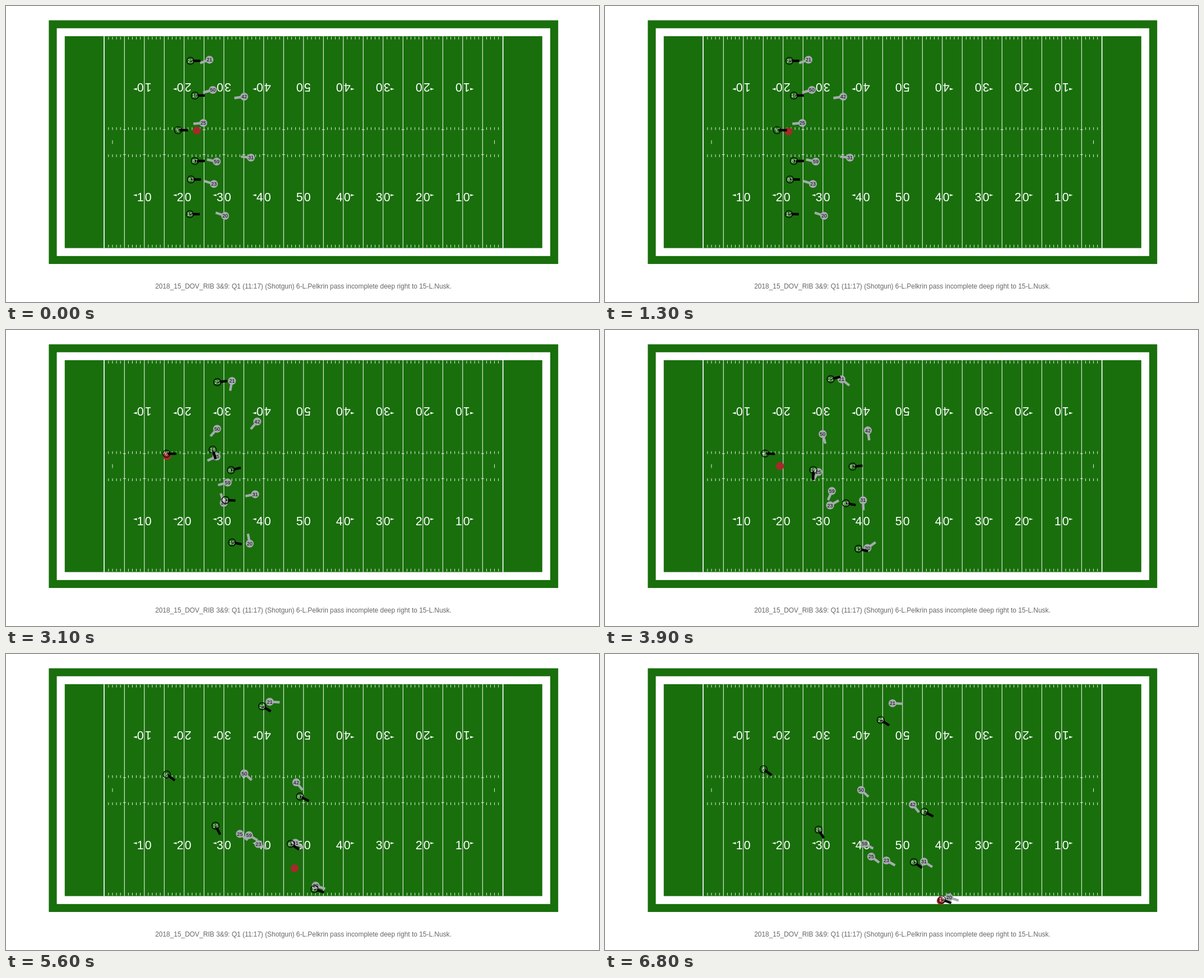
Recreate the animation shown at these times as an HTML page with a canvas. Size 1058 by 529 pixels, loop 6.9 s.

```html
<!DOCTYPE html>
<html lang="en">
<head>
<meta charset="utf-8">
<title>Play tracking</title>
<style>
html, body { margin: 0; width: 100%; height: 100%; overflow: hidden; background: #fff; }
canvas { display: block; }
</style>
</head>
<body>
<canvas id="stage" width="1058" height="529"></canvas>
<script>
const ctx = document.getElementById('stage').getContext('2d');
const LOOP = 6900, STEP = 100, TAU = Math.PI * 2;
const SNAP = 1300, THROW = 3700, CATCH = 6400, END = 6800;
const GREEN = '#196f0c', GREY = '#a5acaf', FONT = '"Liberation Sans", Arial, sans-serif';
const CAPTION = '2018_15_DOV_RIB 3&9: Q1 (11:17) (Shotgun) 6-L.Pelkrin pass incomplete deep right to 15-L.Nusk.';

const clamp = u => Math.max(0, Math.min(1, u));
const mix = (a, b, u) => a + (b - a) * u;
const smooth = (from, to, t) => {
  const u = clamp((t - from) / (to - from));
  return u * u * (3 - 2 * u);
};
const angleTo = (a, b) => Math.atan2(b.y - a.y, b.x - a.x);
const turn = (from, to, u) => from + Math.atan2(Math.sin(to - from), Math.cos(to - from)) * u;

// Smooth route from a standing start at the snap, through evenly timed points
function route(points) {
  const last = points.length - 1;
  return t => {
    const s = clamp((t - SNAP) / (END - SNAP)) * last;
    const i = Math.min(last - 1, Math.floor(s)), u = s - i, v = 1 - u;
    const axis = k => {
      const a = points[i][k], b = points[i + 1][k];
      const leave = i ? (b - points[i - 1][k]) / 2 : 0;
      const arrive = i + 1 < last ? (points[i + 2][k] - a) / 2 : b - a;
      return mix(a, b, u * u * (3 - 2 * u)) + u * v * (leave * v - arrive * u);
    };
    return { x: axis(0), y: axis(1) };
  };
}

const player = (number, ...points) => ({ number, at: route(points) });

const defense = [
  player(21, [363, 96], [404, 91], [450, 85], [513, 88]),
  player(50, [369, 150], [377, 177], [410, 200], [457, 243]),
  player(42, [425, 162], [449, 164], [501, 210], [549, 269]),
  player(25, [352, 209], [376, 227], [394, 299], [475, 362]),
  player(59, [376, 278], [396, 273], [420, 314], [463, 339]),
  player(31, [437, 271], [445, 294], [492, 322], [569, 371]),
  player(23, [371, 318], [389, 309], [427, 327], [502, 369]),
  player(20, [391, 375], [436, 382], [521, 404], [614, 435])
];
const passer = player(6, [307, 222], [286, 221], [288, 219], [283, 206]);
const offense = [
  player(25, [329, 98], [378, 93], [438, 85], [492, 118]),
  player(16, [337, 160], [369, 215], [371, 296], [381, 314]),
  passer,
  player(87, [337, 277], [403, 250], [498, 245], [570, 282]),
  player(83, [330, 310], [393, 304], [483, 325], [551, 372]),
  player(15, [328, 372], [405, 380], [520, 410], [601, 439])
];

function ballAt(t) {
  const held = passer.at(Math.min(t, THROW));
  const snap = clamp((t - 1100) / 500), u = clamp((t - THROW) / (CATCH - THROW));
  const flight = u + 0.13 * u * (1 - u);
  return {
    x: mix(mix(340.5, held.x + 1, snap), 599, flight),
    y: mix(mix(222.5, held.y + 4.5, snap), 441, flight)
  };
}

const heading = (p, t) => angleTo(p.at(t - STEP), p.at(t));

// Defenders watch the passer, then turn and run with the play
function defenderFacing(p, t) {
  const watch = turn(Math.PI, angleTo(p.at(t), passer.at(t)), mix(0.3, 1, smooth(SNAP, 3100, t)));
  return turn(watch, heading(p, t), smooth(2300, 4900, t));
}

function attackerFacing(p, t) {
  return p === passer
    ? turn(0, angleTo(p.at(t), ballAt(t)), smooth(THROW, 5200, t))
    : turn(0, heading(p, t), smooth(SNAP, 2600, t));
}

function box(color, x, y, w, h) {
  ctx.fillStyle = color;
  ctx.fillRect(x, y, w, h);
}

function label(text, x, y, size, color) {
  ctx.font = `${size}px ${FONT}`;
  ctx.fillStyle = color;
  ctx.fillText(text, x, y);
}

function disc({ x, y }, color) {
  ctx.fillStyle = color;
  ctx.beginPath();
  ctx.arc(x, y, 7.1, 0, TAU);
  ctx.fill();
}

const YARD = 7.1, MID_X = 530.8, MID_Y = 243.3, HALF_WIDTH = 80 / 3 * YARD;
const yardX = yard => MID_X + (yard - 50) * YARD;

function drawTurf(color, margin) {
  const w = (60 + margin) * YARD, h = HALF_WIDTH + margin * YARD;
  box(color, MID_X - w, MID_Y - h, 2 * w, 2 * h);
}

function drawYardNumber(yard) {
  const tens = Math.min(yard, 100 - yard) / 10;
  for (const flip of [1, -1]) {
    ctx.save();
    ctx.translate(yardX(yard), MID_Y);
    ctx.scale(flip, flip);
    label(tens, -7.1, 105.2, 21.4, '#fff');
    label('0', 6.9, 105.2, 21.4, '#fff');
    if (yard !== 50) {
      const side = Math.sign(yard - 50) * flip;
      ctx.beginPath();
      ctx.moveTo(side * 20, 94.8);
      ctx.lineTo(side * 13.3, 92.9);
      ctx.lineTo(side * 13.3, 96.7);
      ctx.fill();
    }
    ctx.restore();
  }
}

function drawField() {
  box('#fff', 0, 0, 1058, 529);
  drawTurf(GREEN, 4);
  drawTurf('#fff', 2);
  drawTurf(GREEN, 0);
  const top = MID_Y - HALF_WIDTH;
  for (const x of [yardX(0) - 1.6, yardX(100)]) box('#fff', x, top, 1.7, 2 * HALF_WIDTH);
  for (let yard = 1; yard < 100; yard++) {
    const x = yardX(yard);
    if (yard % 5 === 0) {
      box('#fff', x - 0.5, top, 1, 2 * HALF_WIDTH);
      for (const y of [220.5, 265.2]) box('#fff', x - 2.5, y, 5, 0.9);
    } else {
      for (const y of [55, 216.7, 265.2, 426.7]) box('#fff', x - 0.45, y, 0.9, 4.8);
    }
  }
  for (const yard of [2, 98]) box('#fff', yardX(yard) - 0.5, 240, 0.9, 6.6);
  for (let yard = 10; yard < 100; yard += 10) drawYardNumber(yard);
  label(CAPTION, 530.5, 505, 11.93, '#666');
}

function drawPlayer(p, t, isOffense) {
  const spot = p.at(t), { x, y } = spot;
  const a = (isOffense ? attackerFacing : defenderFacing)(p, t);
  ctx.strokeStyle = isOffense ? '#000' : GREY;
  if (!isOffense) disc(spot, GREY);
  ctx.lineWidth = 4.4;
  ctx.beginPath();
  ctx.moveTo(x, y);
  ctx.lineTo(x + 17.8 * Math.cos(a), y + 17.8 * Math.sin(a));
  ctx.stroke();
  if (isOffense) {
    ctx.lineWidth = 1.2;
    ctx.beginPath();
    ctx.arc(x, y, 6.5, 0, TAU);
    ctx.stroke();
  }
  label(p.number, x, y + 3.2, 9, isOffense ? '#fff' : '#000');
}

function draw(now) {
  const t = Math.floor((now % LOOP) / STEP) * STEP;
  ctx.textAlign = 'center';
  drawField();
  for (const p of defense) drawPlayer(p, t, false);
  disc(ballAt(t), '#a52a2a');
  for (const p of offense) drawPlayer(p, t, true);
}

let start;
function tick(now) {
  start ??= now;
  draw(now - start);
  requestAnimationFrame(tick);
}
requestAnimationFrame(tick);
</script>
</body>
</html>
```
